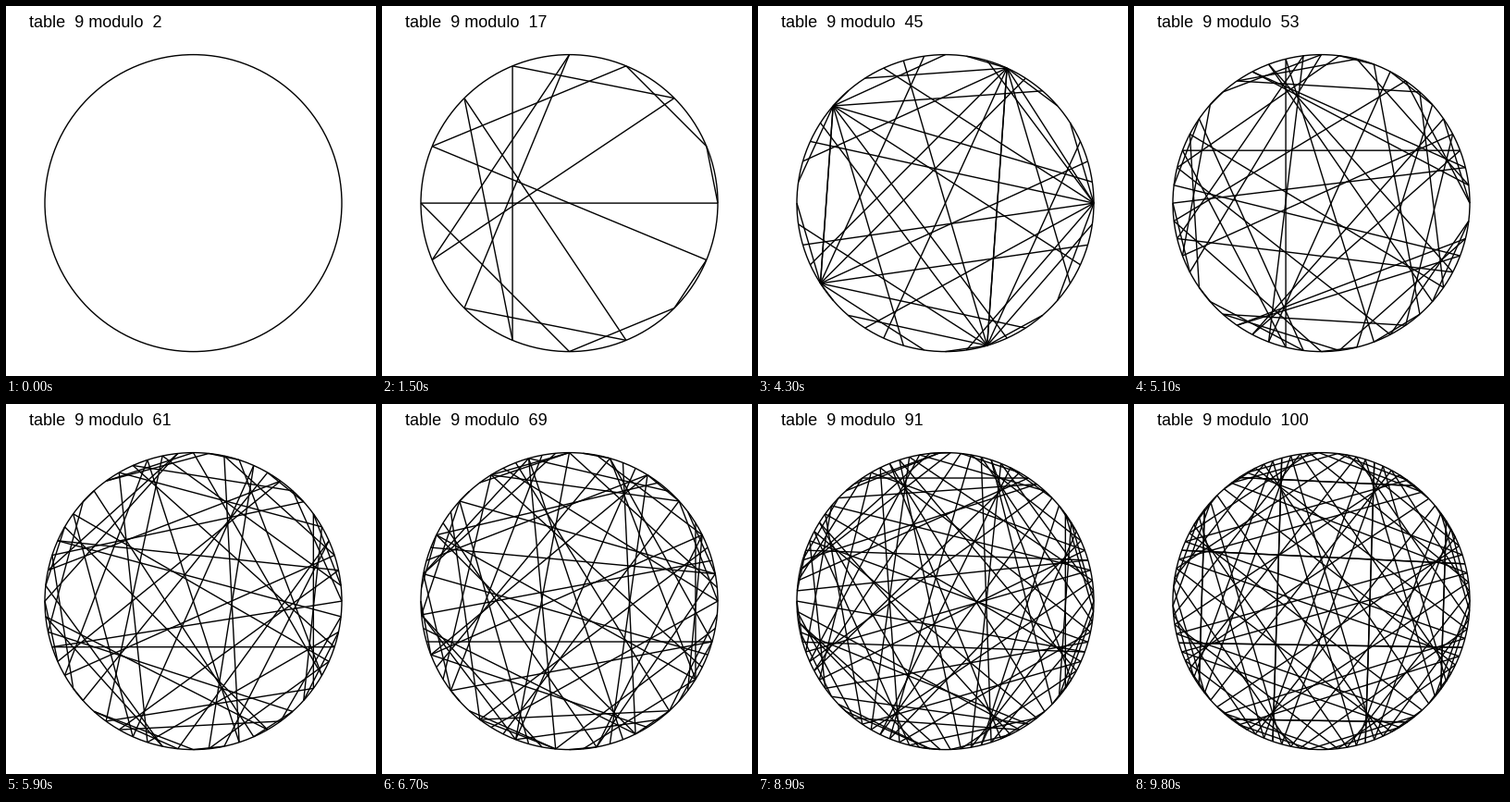
Write a matplotlib script that moves like this. It is 400 px wide and 400 px high and loops after 9900 ms.

```python
import numpy as np
import matplotlib.pyplot as plt
from matplotlib.animation import FuncAnimation
from matplotlib.collections import LineCollection
from matplotlib.patches import Circle

SIZE = 400
DPI = 100
PX = 72 / DPI  # one pixel in points
TABLE = 9
FIRST, LAST = 2, 100
CENTER = np.array([202.5, 213.1])
RADIUS = 160.5
LINE = 1.4 * PX

fig = plt.figure(figsize=(SIZE / DPI, SIZE / DPI), dpi=DPI, facecolor="white")
ax = fig.add_axes([0, 0, 1, 1])
ax.set_xlim(0, SIZE)
ax.set_ylim(SIZE, 0)
ax.axis("off")

ax.add_patch(Circle(CENTER, RADIUS, fill=False, ec="black", lw=LINE))
chords = LineCollection([], colors="black", linewidths=LINE, snap=False)
ax.add_collection(chords)
label = ax.text(24.7, 23, "", family="Liberation Sans", size=18 * PX,
                color="black", va="baseline")


def chord_ends(modulo):
    """Join each i to TABLE * i; the last point falls back on the first."""
    i = np.arange(modulo)
    angle = 2 * np.pi * i / (modulo - 1)
    points = CENTER + RADIUS * np.column_stack([np.cos(angle), np.sin(angle)])
    j = TABLE * i % modulo
    return np.stack([points, points[j]], axis=1)[i != j]


def update(frame):
    modulo = FIRST + frame
    chords.set_segments(chord_ends(modulo))
    label.set_text(f"table  {TABLE} modulo  {modulo}")
    return chords, label


anim = FuncAnimation(fig, update, frames=LAST - FIRST + 1, interval=100,
                     repeat=True, repeat_delay=0)
plt.show()
```
